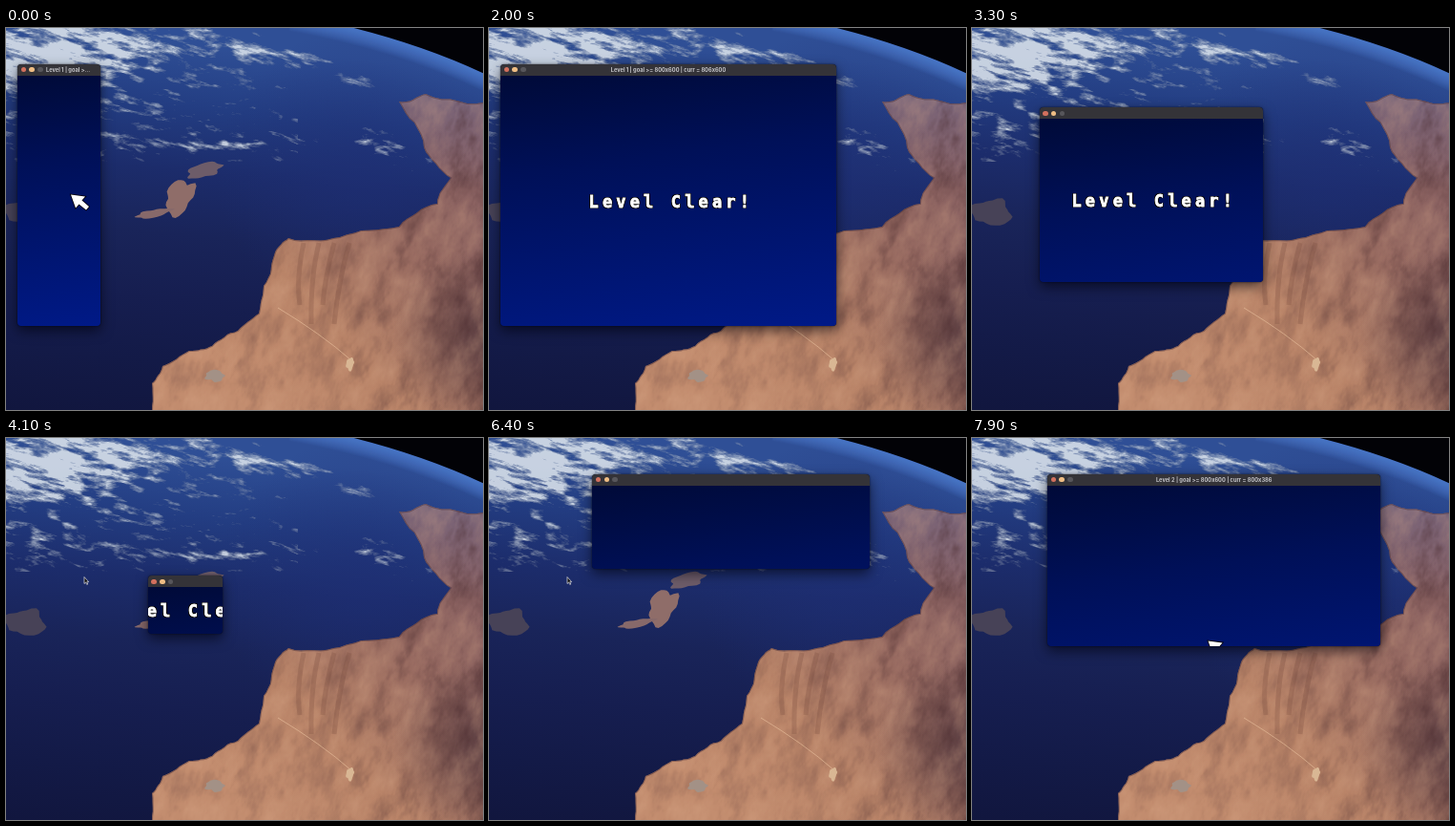
An HTML page with a canvas for the animation above (8000 ms loop, 500 by 400 pixels).

```html
<!DOCTYPE html>
<html lang="en">
<head>
<meta charset="utf-8">
<title>Resize game</title>
<style>
  html, body { margin: 0; width: 100%; height: 100%; overflow: hidden; background: #10163f; }
  #stage { position: relative; width: 500px; height: 400px; overflow: hidden; }
  #stage canvas, #pointer { position: absolute; left: 0; top: 0; }
  #win {
    position: absolute; overflow: hidden; border-radius: 4px; background: #000a34;
    box-shadow: 0 5px 13px rgba(0, 0, 10, .6), 0 0 2px rgba(0, 0, 10, .7);
  }
  #bar { position: absolute; left: 0; right: 0; top: 0; height: 12px; background: #343338; overflow: hidden; }
  #bar i { position: absolute; top: 3.5px; width: 5.4px; height: 5.4px; border-radius: 50%; }
  #title {
    position: absolute; left: 30px; top: 0; overflow: hidden;
    white-space: nowrap; text-overflow: ellipsis; color: #c4c4c8;
    font: 700 5.7px/12px Inter, sans-serif;
  }
  #view {
    position: absolute; left: 0; right: 0; top: 12px; bottom: 0; overflow: hidden;
    background: linear-gradient(172deg, #000a38, #001058 33%, #001a8a) 0 0 / 100% 274px;
  }
  #world { position: absolute; width: 500px; height: 400px; }
  #clear {
    position: absolute; left: 104.5px; top: 171px; white-space: pre; color: #fff;
    font: 700 17px/20px "DejaVu Sans Mono", monospace; letter-spacing: 4.15px;
    -webkit-text-stroke: .8px #fff;
    text-shadow: 1px 1px #000, -1px -1px #000, 1px -1px #000, -1px 1px #000;
  }
  #hero { position: absolute; left: 0; top: 0; overflow: visible; }
</style>
</head>
<body>
<div id="stage">
  <canvas id="earth" width="500" height="400"></canvas>
  <svg id="pointer" width="500" height="400">
    <path d="M82 145.5v7l1.6-1.4 1.2 2.4 1-.5-1.1-2.3h2z" fill="#111" stroke="#e8e8f0" stroke-width=".7"/>
  </svg>
  <div id="win">
    <div id="bar">
      <i style="left:3.5px;background:#d2705e"></i>
      <i style="left:12.3px;background:#efbd84"></i>
      <i style="left:21.2px;background:#57565b"></i>
      <div id="title"></div>
    </div>
    <div id="view">
      <div id="world">
        <div id="clear">Level Clear!</div>
        <svg id="hero" width="22" height="20">
          <path d="M0 0 15 2 11.5 6 19 12.5 16 16 8.5 10 5 14z" fill="#fff" stroke="#000" stroke-width="1.6" paint-order="stroke"/>
        </svg>
      </div>
    </div>
  </div>
</div>
<script>
const $ = id => document.getElementById(id);
const clamp = (v, lo = 0, hi = 1) => Math.min(hi, Math.max(lo, v));

// ---- noise ----
function hash(x, y) {
  let h = Math.imul(x, 374761393) ^ Math.imul(y, 668265263);
  h = Math.imul(h ^ (h >>> 13), 1274126177);
  return ((h ^ (h >>> 16)) >>> 0) / 4294967296;
}
function noise(x, y) {
  const ix = Math.floor(x), iy = Math.floor(y);
  let u = x - ix, v = y - iy;
  u *= u * (3 - 2 * u);
  v *= v * (3 - 2 * v);
  const a = hash(ix, iy), b = hash(ix + 1, iy), c = hash(ix, iy + 1), d = hash(ix + 1, iy + 1);
  return a + (b - a) * u + (c - a + (a - b - c + d) * u) * v;
}
function fbm(x, y) {
  let sum = 0;
  for (let k = 0, f = 1, amp = .5; k < 4; k++, f *= 2.1, amp *= .55)
    sum += amp * noise(x * f + k * 7, y * f + k * 3);
  return sum / 1.01;
}

// ---- backdrop ----
// Paints rgba = shade(x, y) over the whole stage
function layer(shade) {
  const c = document.createElement('canvas');
  c.width = 500; c.height = 400;
  const g = c.getContext('2d'), img = g.createImageData(500, 400);
  for (let y = 0, i = 0; y < 400; y++)
    for (let x = 0; x < 500; x++, i += 4) img.data.set(shade(x, y), i);
  g.putImageData(img, 0, 0);
  return c;
}
const clear = [0, 0, 0, 0];
const oval = (x, y, rx, ry) => 1 - (x / rx) ** 2 - (y / ry) ** 2;

function cloudCover(x, y) {
  const mass = 1.25 * oval(x - 45, y - 28 + x * .06, 165, 52);
  const front = oval(x - 140, y - 85 - .3 * x + .0006 * x * x, 200, 10) * .62;
  const upper = oval(x - 270, y - (x - 180) * .28, 140, 15) * .62;
  const plume = oval(x - 406, y - 128 - (x - 406) * .4, 48, 17) * .62;
  const haze = (.34 - x / 900) * clamp((140 - y) / 25);
  return Math.max(mass, front, upper, plume, haze);
}
function cloudShade(x, y) {
  const cover = cloudCover(x, y);
  if (cover <= 0) return clear;
  const bend = noise(x / 40, y / 30) * 8;
  const n = fbm((x + bend) / 18, (y - x * .2 + bend) / 6);
  const a = clamp((cover + (n - .5) * 2.4 - .4) * 1.3);
  const s = 150 + 70 * a;
  return [s, s + 8, s + 16, a * 225];
}
function landShade(x, y) {
  const n = fbm((x + y * .25) / 17, (y - x * .15) / 30) - .5;
  const rough = .4 + clamp((x - 330) / 150) * .5;
  return n > 0 ? [226, 178, 146, n * 200] : [70, 40, 44, -n * 420 * rough];
}

// Closed outline whose edges are broken up by midpoint displacement
function outline(pts, depth = 3) {
  if (!depth) return pts;
  return outline(pts.flatMap(([x, y], i) => {
    const [u, v] = pts[(i + 1) % pts.length];
    const k = (hash(Math.round(x * 9), Math.round(y * 9)) - .5) * .16;
    return [[x, y], [(x + u) / 2 - (v - y) * k, (y + v) / 2 + (u - x) * k]];
  }), depth - 1);
}
function trace(g, pts) {
  g.beginPath();
  pts.forEach(p => g.lineTo(...p));
  g.closePath();
}
function island(g, cx, cy, rx, ry, tilt, color) {
  const pts = [];
  for (let a = 0; a < 6.28; a += .2) {
    const r = .7 + .55 * noise(cx + 2 * Math.cos(a), cy + 2 * Math.sin(a));
    const x = rx * r * Math.cos(a), y = ry * r * Math.sin(a);
    pts.push([cx + x * Math.cos(tilt) - y * Math.sin(tilt), cy + x * Math.sin(tilt) + y * Math.cos(tilt)]);
  }
  trace(g, pts);
  g.fillStyle = color;
  g.fill();
}
function ramp(grad, ...colors) {
  colors.forEach((c, i) => grad.addColorStop(i / (colors.length - 1), c));
  return grad;
}
function wash(g, fill) {
  g.fillStyle = fill;
  g.fillRect(0, 0, 500, 400);
}

function drawLand(g) {
  const coast = outline([[150, 410], [153, 372], [164, 354], [192, 338], [216, 333], [243, 317],
    [265, 299], [270, 270], [282, 235], [296, 220], [350, 219], [412, 208], [452, 184], [466, 157],
    [438, 125], [412, 77], [440, 69], [510, 77], [510, 410]]);
  g.save();
  trace(g, coast);
  g.clip();
  wash(g, ramp(g.createLinearGradient(240, 370, 500, 150), '#c28c6e', '#b98468', '#976a60', '#876062'));
  wash(g, ramp(g.createRadialGradient(500, 325, 0, 500, 325, 95), 'rgba(72,48,56,.75)', 'rgba(72,48,56,0)'));
  wash(g, ramp(g.createLinearGradient(0, 66, 0, 170), 'rgba(104,104,146,.5)', 'rgba(104,104,146,0)'));
  g.drawImage(layer(landShade), 0, 0);
  g.lineWidth = 5;
  g.strokeStyle = 'rgba(112,70,58,.25)';
  for (let i = 0; i < 4; i++) {
    g.beginPath();
    g.moveTo(312 + i * 16, 225);
    g.quadraticCurveTo(304 + i * 15, 262, 308 + i * 12, 290 + (i % 2) * 20);
    g.stroke();
  }
  g.lineWidth = 1;
  g.strokeStyle = 'rgba(234,194,158,.6)';
  g.stroke(new Path2D('M285 293Q330 320 362 348'));
  g.lineWidth = 2;
  g.strokeStyle = 'rgba(70,44,52,.45)';
  trace(g, coast);
  g.stroke();
  g.restore();
}

function drawEarth() {
  const g = $('earth').getContext('2d');
  wash(g, ramp(g.createLinearGradient(40, 0, 0, 400),
    '#2f4f96', '#233d82', '#1c2c6b', '#192459', '#161e50', '#131a47', '#11163e'));
  wash(g, ramp(g.createRadialGradient(370, 150, 0, 370, 150, 150), 'rgba(30,46,116,.6)', 'rgba(30,46,116,0)'));
  drawLand(g);
  island(g, 20, 192, 23, 14, 0, '#474257');
  island(g, 182, 177, 20, 13, -1, '#8f6d69');
  island(g, 154, 194, 19, 4, -.2, '#87696a');
  island(g, 208, 149, 19, 7, -.25, '#6d5c69');
  island(g, 219, 364, 10, 6, 0, '#a39186');
  island(g, 361, 352, 4, 7, .2, '#d9b794');
  g.drawImage(layer(cloudShade), 0, 0);

  // limb and space
  const limb = 'M300 -14Q420 8 510 52';
  g.strokeStyle = 'rgba(92,140,220,.06)';
  for (let w = 2; w < 36; w += 2) {
    g.lineWidth = w;
    g.stroke(new Path2D(limb));
  }
  g.fillStyle = '#020206';
  g.fill(new Path2D(limb + 'V-14z'));
}

// ---- game ----
const LOOP = 8000, SCALE = .4367, BAR = 12, TOP = 37.5, TIP = 6;
const SPEED = .17, GROW = .149;
const WON = 1700, SHRINK = 2700, SWAP = 4500, READY = 6800, MOVE = 7165;
const small = 200 * SCALE;
const size1 = { w: 352, h: 274 }, size2 = { w: 800 * SCALE, h: small + BAR };

const centred = (cx, cy, w, h) => ({ x: cx - w / 2, y: cy - h / 2, w, h });

// Window box, level and player centre at time t
function pose(t) {
  if (t < SHRINK) {
    const px = 74 + SPEED * t, won = t >= WON;
    const w = won ? size1.w : Math.max(small, px - 12);
    return { x: 12, y: TOP, w, h: size1.h, level: 1, hero: !won && [px, 180], clear: won };
  }
  if (t < SWAP) {
    const k = 1 - (t - SHRINK) / (SWAP - SHRINK);
    return { ...centred(188, TOP + size1.h / 2, size1.w * k, size1.h * k), clear: true };
  }
  if (t < READY) {
    const d = (t - SWAP + 50) * GROW;
    return centred(253.5, TOP + size2.h / 2, Math.min(size2.w, d), Math.min(size2.h, d));
  }
  const py = 93 + SPEED * Math.max(0, t - MOVE);
  return { x: 79, y: TOP, w: size2.w, h: Math.max(size2.h, py - TOP), level: 2, hero: [253.5, py] };
}

function render(time) {
  const p = pose(Math.floor((time % LOOP) / 100) * 100);
  Object.assign($('win').style, {
    left: p.x + 'px', top: p.y + 'px', width: p.w + 'px', height: p.h + 'px'
  });
  $('world').style.transform = `translate(${-p.x}px, ${-p.y - BAR}px)`;
  $('clear').style.display = p.clear ? '' : 'none';
  $('hero').style.display = p.hero ? '' : 'none';
  if (p.hero) $('hero').style.transform = `translate(${p.hero[0] - TIP}px, ${p.hero[1] - TIP}px)`;

  const units = v => Math.round(v / SCALE);
  const title = $('title'), wide = p.w > 185;
  title.textContent = p.level ? `Level ${p.level} | goal >= 800x600 | curr = ${units(p.w)}x${units(p.h - BAR)}` : '';
  title.style.right = wide ? '30px' : '8px';
  title.style.textAlign = wide ? 'center' : 'left';
}

drawEarth();
const start = performance.now();
function tick() {
  render(performance.now() - start);
  requestAnimationFrame(tick);
}
tick();
</script>
</body>
</html>
```
